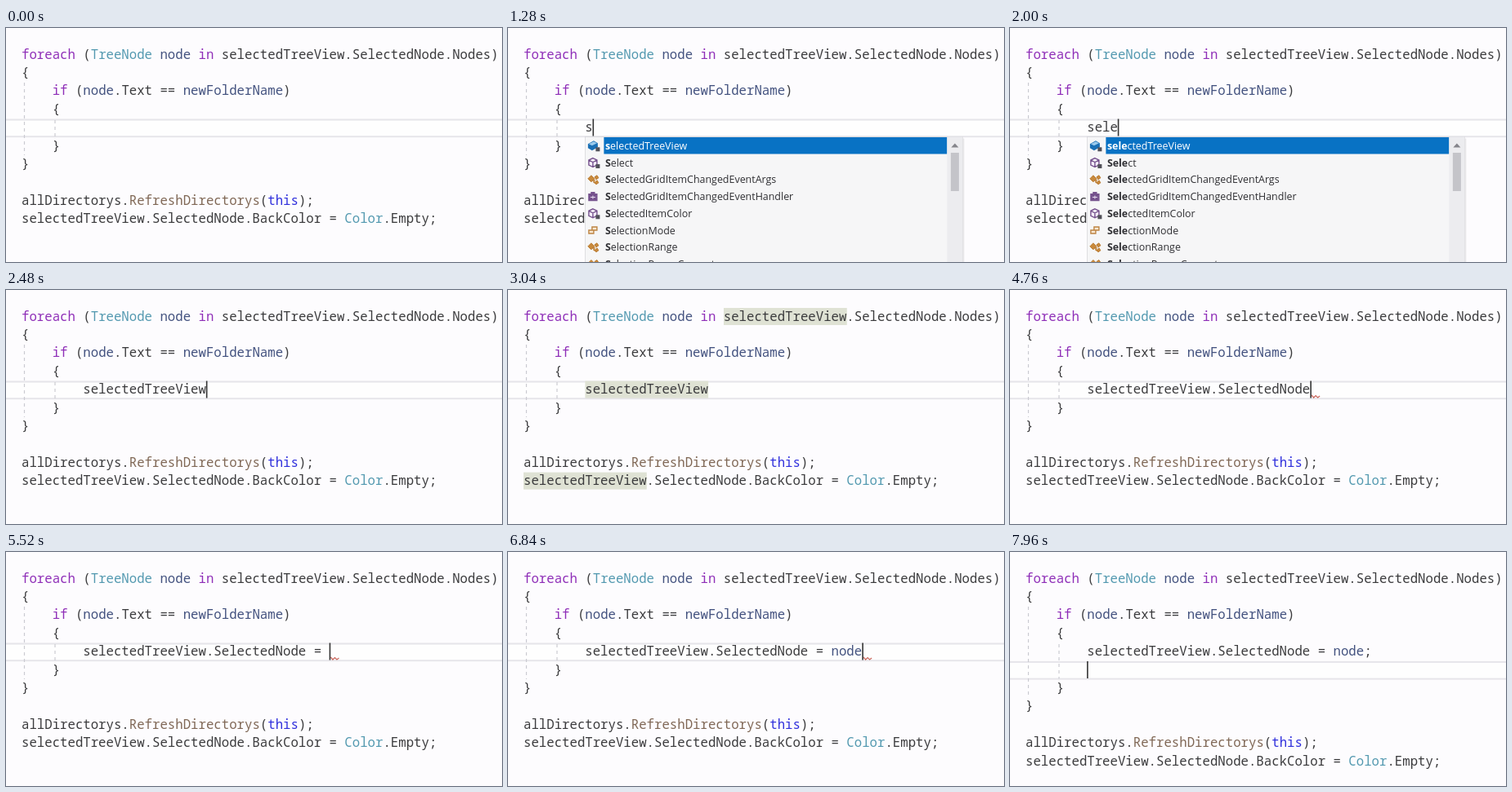
Write an HTML page that moves like this. It is 607x287 px and loops after 8 s.

```html
<!DOCTYPE html>
<html lang="en">
<head>
<meta charset="utf-8">
<title>Code completion</title>
<style>
  html, body { margin: 0; width: 100%; height: 100%; overflow: hidden; background: #fdfcfe; }
  svg { display: block; width: 607px; height: 287px; }
  text { white-space: pre; }
  .code { font: 15.705px "Noto Sans Mono", monospace; fill: #3b3b3d; }
  .list { font: 12.45px "Open Sans", sans-serif; fill: #303034; }
  .list .chosen { fill: #fff; }
  .list tspan { font-weight: 700; }
  .keyword { fill: #8f2fb8; }
  .type { fill: #5399b0; }
  .local { fill: #43527f; }
  .self { fill: #3030dc; }
  .method { fill: #806856; }
</style>
</head>
<body>
<svg viewBox="0 0 607 287"><g id="scene"></g><path id="caret" stroke="#333" stroke-width="1.6"/></svg>
<script>
const LOOP = 8000, BLINK = 530;
const LEFT = 19, CHAR = 9.423, LINE = 22.4, BASE = 37.5;
const ROW = 20.75, POPUP_TOP = 133.5;

const CODE = [
  'foreach (TreeNode node in selectedTreeView.SelectedNode.Nodes)',
  '{',
  '    if (node.Text == newFolderName)',
  '    {',
  '',
  '    }',
  '}',
  '',
  'allDirectorys.RefreshDirectorys(this);',
  'selectedTreeView.SelectedNode.BackColor = Color.Empty;'
];

const SYNTAX = {
  keyword: /^(foreach|in|if)$/,
  type: /^(TreeNode|Color)$/,
  local: /^(node|newFolderName)$/,
  self: /^this$/,
  method: /^RefreshDirectorys$/
};

// Each list: text column, width of the chosen row, scroll thumb, "icon label" items
const LISTS = {
  view: { col: 8, rowWidth: 420, bar: 19, thumb: 47, items: [
    'field selectedTreeView', 'cube Select', 'class SelectedGridItemChangedEventArgs',
    'delegate SelectedGridItemChangedEventHandler', 'cube SelectedItemColor',
    'enum SelectionMode', 'class SelectionRange', 'class SelectionRangeConverter'] },
  member: { col: 25, rowWidth: 209, bar: 17, thumb: 83, items: [
    'wrench ★ SelectedNode', 'cube Select', 'wrench SelectedImageIndex',
    'wrench SelectedImageKey', 'wrench SelectedNode', 'cube SelectNextControl',
    'cube SendToBack', 'cube SetBounds'] },
  local: { col: 40, rowWidth: 260, bar: 17, thumb: 47, items: [
    'field node', 'class NodeLabelEditEventArgs', 'delegate NodeLabelEditEventHandler',
    'enum None', 'class NotifyIcon', 'class NotSupportedException',
    'class NullReferenceException', 'class Nullable'] }
};

const VIEW = 'selectedTreeView', FULL = VIEW + '.SelectedNode';
const STEPS = [
  { at: 0, typed: '', hideCaret: true },
  { at: 120, typed: '' },
  { at: 1200, typed: 's', list: 'view' },
  { at: 1400, typed: 'se', list: 'view' },
  { at: 1600, typed: 'sel', list: 'view' },
  { at: 1800, typed: 'sele', list: 'view' },
  { at: 2320, typed: VIEW },
  { at: 2720, typed: VIEW, mark: VIEW, since: 2320 },
  { at: 3440, typed: VIEW + '.', list: 'member', error: true },
  { at: 3640, typed: VIEW + '.s', list: 'member', error: true },
  { at: 3800, typed: VIEW + '.se', list: 'member', error: true },
  { at: 4560, typed: FULL, error: true },
  { at: 4960, typed: FULL, mark: 'SelectedNode', error: true, since: 4560 },
  { at: 5360, typed: FULL + ' ', error: true },
  { at: 5440, typed: FULL + ' =', error: true },
  { at: 5520, typed: FULL + ' = ', error: true },
  { at: 5760, typed: FULL + ' = n', list: 'local', error: true },
  { at: 5960, typed: FULL + ' = no', list: 'local', error: true },
  { at: 6120, typed: FULL + ' = nod', list: 'local', error: true },
  { at: 6320, typed: FULL + ' = node', list: 'local', error: true },
  { at: 6640, typed: FULL + ' = node', error: true },
  { at: 7160, typed: FULL + ' = node;' },
  { at: 7560, typed: FULL + ' = node;', newline: true }
];

const ICONS = {
  cube: '<path d="M0-5.5L5-3V3L0 5.5L-5 3V-3ZM-5-3L0-.5L5-3M0-.5V5.5" fill="#f4edf9" stroke="#75528d" stroke-width="1.4"/>',
  field: '<path d="M-6-2L1-6L6-3V2L-1 6L-6 3Z" fill="#1a6fb5"/><path d="M-5-2L1-5L5-3L-1 0Z" fill="#9ccbed"/>',
  class: '<path d="M-6-1L-2-5L2-1L-2 3ZM2-3L5-5L7-2L4 0ZM2 4L5 1L7 4L4 6ZM-1 1H3M1 0V4H3" fill="#c98a3c" stroke="#b97a30"/>',
  delegate: '<path d="M-5-3H5V5H-5ZM-2-3V-5H2V-3" fill="#75528d" stroke="#75528d" stroke-width="1.3"/><path d="M-3 1H3M0-1V3" stroke="#e8ddf0"/>',
  enum: '<path d="M-1-4H5V0H-1ZM-5 0H1V4H-5Z" fill="#f8e8d2" stroke="#bd8443" stroke-width="1.4"/>',
  wrench: '<path d="M-5 5L1-1" stroke="#444" stroke-width="3" stroke-linecap="round"/><path d="M3-5A3 3 0 1 0 5-2" fill="none" stroke="#444" stroke-width="2.6"/>'
};

const rect = (x, y, w, h, fill, extra = '') =>
  `<rect x="${x}" y="${y}" width="${w}" height="${h}" fill="${fill}" ${extra}/>`;
const columnX = col => LEFT + col * CHAR;
const lineTop = row => BASE + row * LINE - 15;

function paintSyntax(line) {
  return line.replace(/\w+/g, word => {
    const kind = Object.keys(SYNTAX).find(name => SYNTAX[name].test(word));
    return kind ? `<tspan class="${kind}">${word}</tspan>` : word;
  });
}

function drawMarks(lines, word) {
  return lines.map((line, row) =>
    [...line.matchAll(new RegExp(`\\b${word}\\b`, 'g'))].map(hit =>
      rect(columnX(hit.index), lineTop(row) - .5, word.length * CHAR, 21, '#dfe2d4')).join('')
  ).join('');
}

function drawGuide(x, top, bottom) {
  return `<path d="M${x} ${top}V${bottom}" stroke="#cbcbd1" stroke-width="1.2" stroke-dasharray="4 4"/>`;
}

function drawList({ col, rowWidth, bar, thumb, items }, prefix) {
  const x = columnX(col), rowX = x + 23, barX = rowX + rowWidth;
  const rows = items.map((item, i) => {
    const [icon, ...rest] = item.split(' ');
    const label = rest.join(' ');
    const hit = new RegExp(`(^|★ )(${prefix})`, 'i');
    const text = prefix ? label.replace(hit, '$1<tspan>$2</tspan>') : label;
    const y = 144.3 + i * ROW;
    const badge = col === 8 && (icon === 'field' || icon === 'cube')
      ? rect(x + 13, y + 2, 5, 5, '#505058') : '';
    return `<g transform="translate(${x + 9.5} ${y})">${ICONS[icon]}</g>${badge}` +
      `<text x="${rowX + 1.5}" y="${y + 4.6}" class="${i ? '' : 'chosen'}">${text}</text>`;
  }).join('');
  return `<g class="list">` +
    rect(x + 2, POPUP_TOP + 2, 23 + rowWidth + bar, 160, '#000', 'opacity=".08"') +
    rect(x, POPUP_TOP, 23 + rowWidth + bar, 160, '#f6f6f7', 'stroke="#d6d6da" stroke-width=".8"') +
    rect(rowX, 134, rowWidth, 20.5, '#0872c4') +
    rect(barX, POPUP_TOP, bar, 160, '#ececef') +
    `<path d="M${barX + bar / 2 - 4.5} 146.5l4.5-5l4.5 5z" fill="#85858b"/>` +
    rect(barX + bar / 2 - 5, 153, 10, thumb, '#c4c4c9') + rows + '</g>';
}

function drawScene({ typed, list, mark, error, newline }) {
  const lines = [...CODE];
  lines[4] = typed && '        ' + typed;
  if (newline) lines.splice(5, 0, '');
  const shift = newline ? LINE : 0;
  const caretX = columnX(8 + (newline ? 0 : typed.length)) + .5;
  const top = 112.5 + shift;

  let out = rect(-2, top, 611, 20.7, '#fefefe', 'stroke="#e6e5ea" stroke-width="2"');
  out += drawGuide(22.5, 67, 156 + shift) + drawGuide(60, 113, 133 + shift);
  if (mark) out += drawMarks(lines, mark);
  out += lines.map((line, row) =>
    `<text class="code" x="${LEFT}" y="${BASE + row * LINE}">${paintSyntax(line)}</text>`).join('');
  if (error) {
    out += `<path d="M${caretX + 1} 129l2.5 3l2.5-2.5l2.5 2.5l2.5-2" fill="none" stroke="#c9665c" stroke-width="1.2"/>`;
  }
  if (list) out += drawList(LISTS[list], typed.match(/\w*$/)[0]);

  scene.innerHTML = out;
  caret.setAttribute('d', `M${caretX} ${top - 1}v21`);
}

const scene = document.getElementById('scene');
const caret = document.getElementById('caret');
const start = performance.now();
let current;

function tick() {
  const time = (performance.now() - start) % LOOP;
  const step = STEPS.findLast(s => s.at <= time);
  if (step !== current) drawScene(current = step);
  const age = time - (step.since ?? step.at);
  const visible = !step.hideCaret && age % (2 * BLINK) < BLINK;
  caret.setAttribute('visibility', visible ? 'visible' : 'hidden');
  requestAnimationFrame(tick);
}
tick();
</script>
</body>
</html>
```
